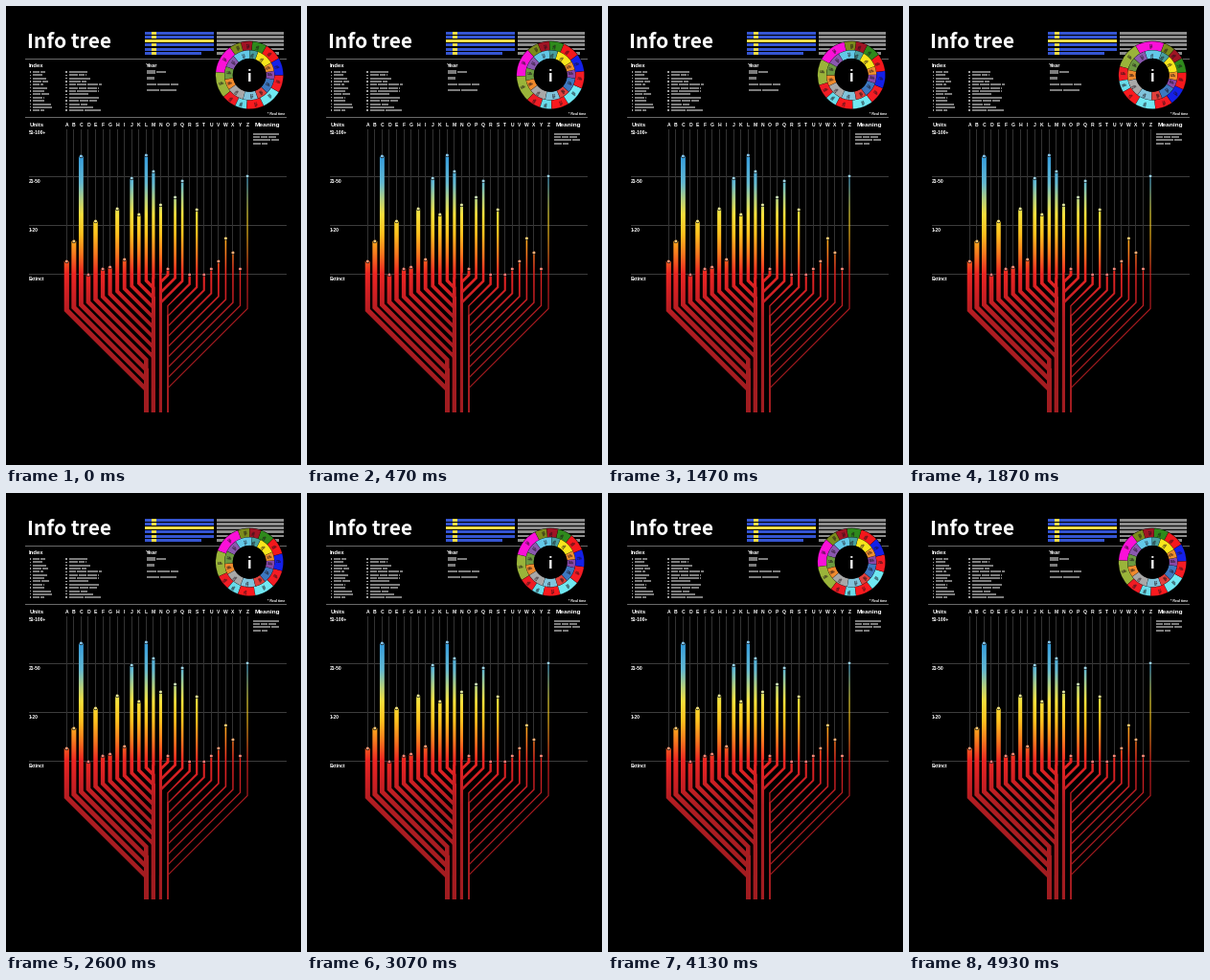
Recreate the animation shown at these times as a matplotlib script. Size 308 px wide and 480 px high, loop 4990 ms.

```python
import random

import matplotlib.pyplot as plt
import numpy as np
from matplotlib.animation import FuncAnimation
from matplotlib.patches import Circle, Rectangle, Wedge
from matplotlib.path import Path

W, H, DPI = 308, 480, 100
FRAMES, LOOP_MS = 75, 4990
PX = 72 / DPI
GRAY = "#7c7c7c"
rng = random.Random(7)

fig = plt.figure(figsize=(W / DPI, H / DPI), dpi=DPI, facecolor="black")
ax = fig.add_axes([0, 0, 1, 1])


def text(x, y, s, size, font="Liberation Sans", color="white", ha="left", **kw):
    return ax.text(x, y, s, fontsize=size * PX, family=font, weight="bold",
                   color=color, ha=ha, va=kw.pop("va", "baseline"), **kw)


def rect(x, y, w, h, color, z=2):
    ax.add_patch(Rectangle((x, y), w, h, fc=color, lw=0, zorder=z))


def words(x, y, total, h=2, color=GRAY):
    """A row of small blocks standing for a line of tiny text."""
    end = x + total
    while x < end - 1:
        w = min(rng.uniform(6, 14), end - x)
        rect(x, y, w, h, color)
        x += w + 0.6


# Header
text(22, 43.9, "Info tree", 20.8, "Noto Sans CJK JP")
for row in range(6):
    y = 26.7 + 4.2 * row
    length = 59 if row == 5 else 72
    rect(145, y, length, 3, "#f4dc48" if row == 2 else "#3555d2")
    rect(152, y, 5, 3, "#f4dc48")
    rect(219.5, y, 65 if row == 5 else 70.5, 2.9, "#8c8c8c")

for y in (55, 116):
    rect(20, y, 273, 1, "#6a6a6a", 1)
for y in (178, 229, 280):
    rect(24, y, 269, 1, "#3c3c3c", 1)

text(24, 63.8, "Index", 6)
text(146, 63.8, "Year", 6)
text(24.5, 126.2, "Units", 6)
text(259.5, 126.2, "Meaning", 6.5)
for y, label in ((134.2, "51-100+"), (185, "21-50"), (236.2, "1-20"), (287, "Extinct")):
    text(24, y, label, 4.9)
text(291, 113.5, "* Real time", 3.5, ha="right")

for row in range(13):
    y = 68 + 3.35 * row
    for x, low, high in ((24.5, 10, 20), (62, 18, 38)):
        rect(x, y + 0.2, 1.6, 1.4, "#a0a0a0")
        words(x + 3.5, y, rng.uniform(low, high))

rect(147, 66.7, 8.5, 4, GRAY)
words(157, 68, 10)
rect(147, 73.7, 8, 3.3, GRAY)
words(147, 81, 33)
words(147, 87.3, 31)
for row, length in enumerate((27, 24, 27, 15)):
    words(258, 132.5 + 3.4 * row, length)

# Tree
tops = [267, 246, 157, 281, 225, 275, 273, 212, 265, 180, 218, 156, 173,
        208, 275, 200, 183, 281, 213, 281, 275, 267, 243, 258, 275, 178]
stops = [0, 160, 185, 203, 218, 238, 258, 280, 300, 325, 425]
shades = np.array([(58, 160, 220), (58, 160, 220), (100, 185, 210),
                   (185, 210, 125), (245, 225, 60), (253, 195, 30),
                   (246, 125, 30), (236, 38, 35), (208, 32, 36),
                   (176, 29, 34), (160, 28, 32)]) / 255


def shade(y):
    return np.stack([np.interp(y, stops, c) for c in shades.T], axis=-1)


def branch(x, top, bend, trunk, w, w_end):
    """Outline of a stroke that runs down, slants at 45 degrees, runs down."""
    low = bend + abs(trunk - x)
    h, e = w / 2, w_end / 2
    k = np.tan(np.pi / 8) * np.sign(trunk - x)
    pts = [(x - h, top), (x - h, bend + k * h), (trunk - e, low + k * e), (trunk - e, 425),
           (trunk + e, 425), (trunk + e, low - k * e), (x + h, bend - k * h), (x + h, top)]
    return Path(pts + [pts[0]], closed=True)


trunks = [(146.3, 4.6), (153.7, 3.5), (161.3, 2.7), (168.9, 1.3)]
shapes = []
for i, top in enumerate(tops):
    x = 63.3 + 7.55 * i
    w = 5.2 - 4.1 * i / 25
    trunk, end = trunks[(i > 3) + (i > 12) + (i > 16)]
    bend = 318 - 2.8 * i if i < 13 else 316.5 - 3.2 * (25 - i)
    shapes.append(branch(x, top, bend, trunk, w, min(w, end)))
    text(x, 126.2, chr(65 + i), 5, ha="center")
    rect(x - 0.5, 129, 1, top - 129, "#333333", 1)
    ax.add_patch(Circle((x, top), 2.1, fc="black", lw=0, zorder=4))
    ax.add_patch(Circle((x, top), 1.5, fc=0.6 * shade(top) + 0.4, lw=0, zorder=5))
for x, w in trunks:
    shapes.append(branch(x, 400, 405, x, w, w))

gradient = ax.imshow(shade(np.arange(H) + 0.5)[:, None, :], extent=[0, W, H, 0],
                     aspect="auto", interpolation="nearest", zorder=3)
gradient.set_clip_path(Path.make_compound_path(*shapes), ax.transData)

# Wheel: colour and span in degrees, counter-clockwise
CX, CY = 254.2, 72.3
outer_parts = [("#fa10d8", 50), ("#9ab43a", 45), ("#f01c24", 25), ("#68dcea", 20),
               ("#fa1a1e", 30), ("#70e8f2", 35), ("#f41c24", 30), ("#1420e8", 30),
               ("#f4181c", 30), ("#2f8a1c", 25), ("#a01424", 20), ("#7c8c1c", 20)]
inner_parts = [("#62c8e8", 40), ("#8a58b0", 30), ("#6c9a40", 30), ("#f08a2c", 25),
               ("#a8a8a8", 40), ("#80c4dc", 35), ("#e0403c", 25), ("#3c78c0", 35),
               ("#8848a8", 20), ("#f0902c", 20), ("#f8e61c", 40), ("#48a0a0", 20)]
ax.add_patch(Circle((CX, CY), 35.6, fc="black", lw=0, zorder=6))


class Ring:
    def __init__(self, parts, radius, width):
        self.mid = radius - width / 2
        self.parts = []
        start = -parts[0][1] / 2
        for color, span in parts:
            wedge = Wedge((CX, CY), radius, 0, span, width=width, fc=color,
                          ec="black", lw=0.1, zorder=7)
            ax.add_patch(wedge)
            label = text(CX, CY, f"{rng.randint(1, 9)}.{rng.randint(0, 9)}k", 3,
                         color="#1c1018", ha="center", va="center", zorder=8,
                         rotation_mode="anchor")
            self.parts.append((wedge, label, start, span))
            start += span

    def turn(self, angle):
        for wedge, label, start, span in self.parts:
            a = angle + start
            wedge.set_theta1(-a - span)
            wedge.set_theta2(-a)
            a += span / 2
            r = np.radians(a)
            label.set_position((CX + self.mid * np.cos(r), CY - self.mid * np.sin(r)))
            label.set_rotation(a if np.cos(r) >= 0 else a + 180)


outer = Ring(outer_parts, 35.3, 9.3)
inner = Ring(inner_parts, 26, 8.7)
ax.add_patch(Circle((CX, CY), 17.4, fc="black", lw=0, zorder=9))
text(CX, 78.7, "i", 15.5, "Noto Sans CJK JP", ha="center", zorder=10)

ax.set_xlim(0, W)
ax.set_ylim(H, 0)
ax.axis("off")

swing_at = [0, 15, 28, 39, 54, 62, 74]
swing = [150, 165, 95, 135, 150, 163, 152]


def update(frame):
    angle = np.interp(frame, swing_at, swing, period=FRAMES)
    outer.turn(angle)
    inner.turn(50 + 0.4 * angle)
    return []


anim = FuncAnimation(fig, update, frames=FRAMES, interval=LOOP_MS / FRAMES,
                     repeat=True, repeat_delay=0, blit=False)
plt.show()
```
